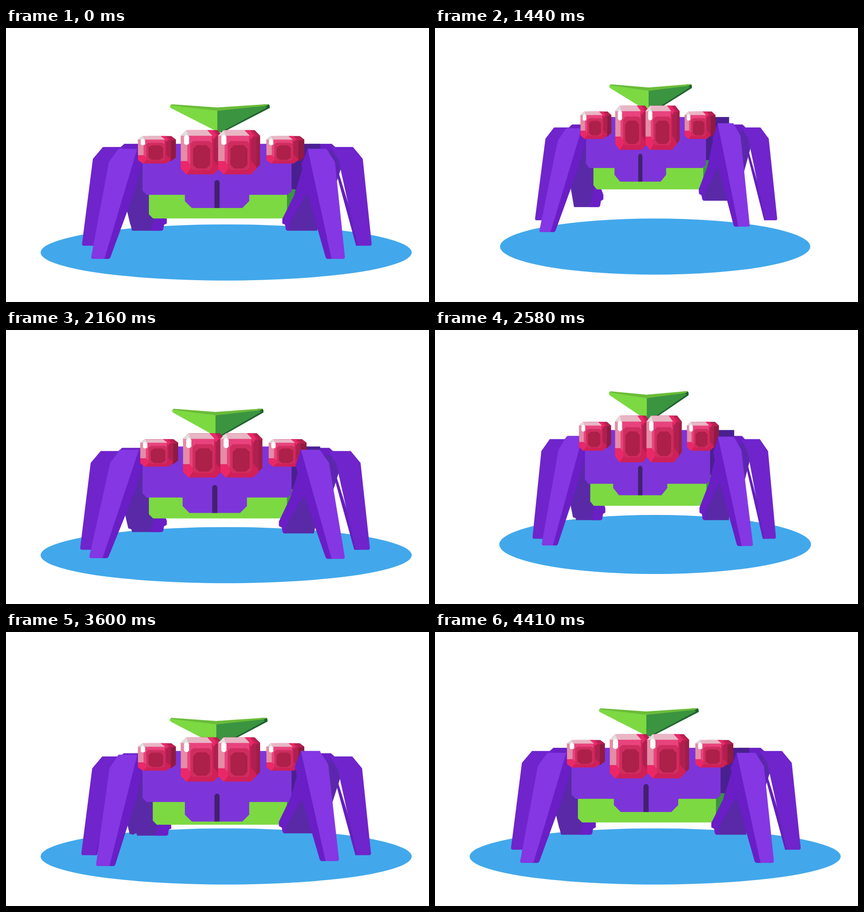
Animation of 929 by 603 pixels, one loop 4.47 s. Source, as an HTML page with a canvas:

```html
<!DOCTYPE html>
<html lang="en">
<head>
<meta charset="utf-8">
<title>Spider robot</title>
<style>
html, body { margin: 0; width: 100%; height: 100%; overflow: hidden; background: #fff; }
canvas { display: block; }
</style>
</head>
<body>
<canvas id="stage" width="929" height="603"></canvas>
<script>
const ctx = document.getElementById('stage').getContext('2d');
const LOOP = 4470, CX = 483.5, FLOOR = 494;

function ramp(t, from, to) {
  const p = Math.min(1, Math.max(0, (t - from) / (to - from)));
  return p * p * (3 - 2 * p);
}
const bump = (t, from, peak, to) => ramp(t, from, peak) - ramp(t, peak, to);

// How strongly each movement acts at time t, from 0 to 1
const moves = t => ({
  step: bump(t, 600, 1020, 1240),
  hop: bump(t, 1240, 1440, 1690),
  settle: bump(t, 1690, 2160, 2580),
  leap: bump(t, 2160, 2580, 2940),
  duck: ramp(t, 2940, 3300) - ramp(t, 3660, 4200),
  bob: t > 60 && t < 1020 ? Math.sin(Math.PI * (t - 60) / 480) ** 2 : 0,
  glance: bump(t, 60, 300, 540),
  dip: [1260, 1690, 2340, 2940].reduce((sum, at) => sum + bump(t, at - 110, at, at + 150), 0),
  swayL: bump(t, 3655, 3770, 3885),
  swayR: bump(t, 3885, 4060, 4260)
});

function poly(color, pts, map) {
  ctx.beginPath();
  for (let i = 0; i < pts.length; i += 2) ctx.lineTo(...map(pts[i], pts[i + 1]));
  ctx.closePath();
  ctx.fillStyle = ctx.strokeStyle = color;
  ctx.fill();
  ctx.stroke();
}

const shift = (dx, dy, s = 1) => (x, y) => [464 + (x - 464) * s + dx, y + dy];

// Moves hip and foot apart; a mirror sum flips the left limb to the right.
function limb(mirror, footY, hx, hy, fx, fy) {
  return (x, y) => {
    const k = (y - 262) / (footY - 262);
    return [(mirror ? mirror - x : x) + hx + (fx - hx) * k, y + hy + (fy - hy) * k];
  };
}

function outerLeg(right, { hop, settle, leap, duck }) {
  const drift = settle + leap;
  const m = limb(right && 970, 479,
    (right ? 5 - 2 * hop : 5 * hop) - 5 * drift - 1.5 * duck, -30 * hop + 3 * settle + 12 * (leap + duck),
    hop - 4 * drift - 1.5 * duck, -43 * hop + 3 * drift + 12 * duck);
  poly('#5a29a8', [225, 264, 300, 264, 300, 425, 280, 434, 273, 432, 266, 402], m);
  poly('#6a20c4', [252, 262, 260, 255, 310, 255, 310, 272, 252, 272], m);
  poly('#641fbe', [262, 262, 248, 320, 201, 479, 190, 479], m);
  poly('#6f24cc', [213, 262, 262, 262, 244, 290, 198, 479, 169, 479, 167, 476, 191, 288], m);
}

function backLeg(right, { step, hop, settle, leap, duck }) {
  const lean = hop + settle + leap + duck;
  const m = right
    ? limb(960, 446, -11 * lean - 9 * hop, -44 * hop, -7 * lean, -53 * hop - 3 * (leap + duck))
    : limb(0, 446, 0, 7 * duck - 45 * hop, 8 * step - 6.5 * hop + 11 * duck,
      2 * duck - 39 * hop - 4 * step - 3 * (settle + leap));
  const edge = right ? [338, 446, 338, 430, 296, 360] : [317, 446, 326, 420, 326, 300];
  poly('#5a29a8', [300, 290, 266, 402, 277, 446, 340, 446, 340, 420, 326, 366], m);
  poly('#6a1ec6', [305, 298, 326, 366, 353, 420, 353, 430, 347, 433, 345, 444, 342, 446, ...edge], m);
}

function frontLeg(right, { step, hop, settle, leap, duck }) {
  const lean = hop + settle + leap + duck;
  const m = right
    ? limb(931, 508, 20 + step - 15 * lean, -43 * hop - 4 * (settle + duck) + 3 * leap,
      step - 12.5 * hop - 5 * leap - 13 * duck, -58 * hop - 6 * settle - 11 * leap - 4 * duck)
    : limb(0, 508, 4 * (step + settle) + 3 * hop + 6 * leap, -32 * hop - 4 * settle + 2 * leap + 4 * duck,
      8.5 * step - 7.5 * hop - 4 * settle + 11 * duck,
      -2.5 * step - 46 * hop - 7.5 * settle - 12 * leap + 7 * duck);
  poly('#6a1ec6', [280, 266, 288, 266, 299, 300, 282, 360, 229, 505, 226, 508, 214, 508], m);
  poly('#8437e3', [247, 266, 288, 266, 216, 508, 189, 508, 187, 505, 226, 295], m);
}

const oct = (l, t, r, b, c) => [l + c, t, r - c, t, r, t + c, r, b - c, r - c, b, l + c, b, l, b - c, l, t + c];

// Faceted gem on an 84 by 97 grid
function eye(x, y, w, h, depth, shade, map) {
  const draw = (color, pts) => poly(color, pts, (px, py) => map(x + px * w / 84, y + py * h / 97));
  const d = depth * 84 / w;
  draw(shade, oct(d, 0, 84 + d, 88, 12));
  draw('#b32250', [60, 0, 72 + d, 0, 84 + d, 13, 80, 16]);
  draw('#cf2058', oct(0, 0, 84, 97, 12));
  draw('#ad2050', [72, 14, 84, 14, 84, 80, 72, 66]);
  draw('#e9296a', [58, 0, 70, 0, 78, 12, 72, 20, 68, 13]);
  draw('#e8437c', [14, 12, 68, 12, 68, 80, 24, 80, 14, 68]);
  draw('#e8b6c5', [12, 0, 58, 0, 69, 12, 14, 12]);
  draw('#e58ca6', [0, 12, 14, 12, 14, 68, 0, 68]);
  draw('#e2dedd', [12, 0, 16, 12, 0, 12]);
  draw('#ea2868', [0, 68, 14, 68, 24, 82, 12, 97, 0, 85]);
  draw('#cf2d60', oct(21, 24, 69, 87, 6));
  draw('#ad2049', oct(27, 33, 64, 84, 8));
  draw('#fff', oct(7, 11, 18, 32, 3));
}

function drawLeaf({ step, hop, settle, leap, duck, bob }) {
  const m = shift(6 * step + 2 * hop - 4 * settle - 2.5 * (leap + duck),
    21 * duck - 12 * bob - 31 * hop + 4 * settle + 6 * leap - step,
    1 - .04 * step - .01 * hop - .085 * settle - .05 * leap - .02 * duck);
  poly('#1f6030', [566, 168, 577, 168, 579, 171, 579, 176, 475, 230, 464, 228], m);
  poly('#3b9440', [464, 182, 568, 170, 573, 175, 471, 229, 464, 228], m);
  poly('#7cd942', [361, 170, 464, 181, 464, 228, 362, 176, 360, 173], m);
  poly('#6abc38', [361, 170, 364, 168, 464, 175, 570, 168, 577, 168, 572, 171, 464, 182], m);
}

function drawBody({ step, hop, settle, leap, duck }) {
  const body = shift(-5 * step - 4 * hop, 7 * duck - 46 * hop, 1 - .037 * hop);
  poly('#4a2090', [620, 255, 690, 255, 690, 280, 655, 300, 634, 367, 620, 367], body);

  const jaw = shift(4 * duck - 6 * step, 5 * duck - 51 * hop - 6 * (settle + leap), 1 - .05 * hop - .03 * duck);
  poly('#3b9440', [617, 355, 636, 355, 621, 419, 609, 419, 617, 411], jaw);
  poly('#7cd942', [314, 355, 617, 355, 617, 411, 609, 419, 323, 419, 314, 410], jaw);
  poly('#7d35d9', [300, 255, 627, 255, 627, 360, 618, 367, 309, 367, 300, 358], body);

  const chin = shift(-5 * (step + settle) - 19 * (hop + leap),
    21 * duck - step - 45 * hop + 5 * (settle - leap), 1 - .04 * hop);
  poly('#7d35d9', [393, 345, 534, 345, 534, 381, 519, 396, 408, 396, 393, 381], chin);
  poly('#432070', [458, 339, 461, 335, 466, 335, 469, 339, 469, 396, 458, 396], chin);
}

function drawEyes({ hop, settle, leap, duck, glance }) {
  const m = shift(5 * (settle - leap - glance) - 7.5 * hop, 7 * duck + settle - 41 * hop, 1 - .03 * hop);
  eye(290, 238, 72, 60, 11, '#8f1a42', m);
  eye(572, 238, 70, 60, 13, '#8f1a42', m);
  eye(384, 225, 84, 97, 8, '#a01d46', m);
  eye(466, 225, 84, 97, 8, '#a01d46', m);
}

function render(t) {
  const mv = moves(t);
  ctx.setTransform(1, 0, 0, 1, 0, 0);
  ctx.clearRect(0, 0, 929, 603);
  ctx.translate(CX - 24 * mv.swayL + 29 * mv.swayR,
    FLOOR - 13 * mv.hop - 22 * mv.leap + 1.5 * mv.settle + 6 * mv.dip + 4 * mv.swayL + 13 * mv.swayR);
  ctx.scale(1 - .164 * mv.hop - .16 * mv.leap, 1 + .053 * mv.leap);
  ctx.translate(-CX, -FLOOR);
  ctx.lineWidth = .3;
  ctx.lineJoin = 'round';

  ctx.fillStyle = '#42a8eb';
  ctx.beginPath();
  ctx.ellipse(CX, FLOOR, 407.5, 61.7, 0, 0, 7);
  ctx.fill();

  outerLeg(false, mv);
  backLeg(false, mv);
  frontLeg(false, mv);
  drawLeaf(mv);
  outerLeg(true, mv);
  drawBody(mv);
  drawEyes(mv);
  backLeg(true, mv);
  frontLeg(true, mv);
}

const start = performance.now();
function frame() {
  const t = Math.max(0, performance.now() - start) % LOOP;
  render(Math.floor(t / 30) * 30);
  requestAnimationFrame(frame);
}
frame();
</script>
</body>
</html>
```
